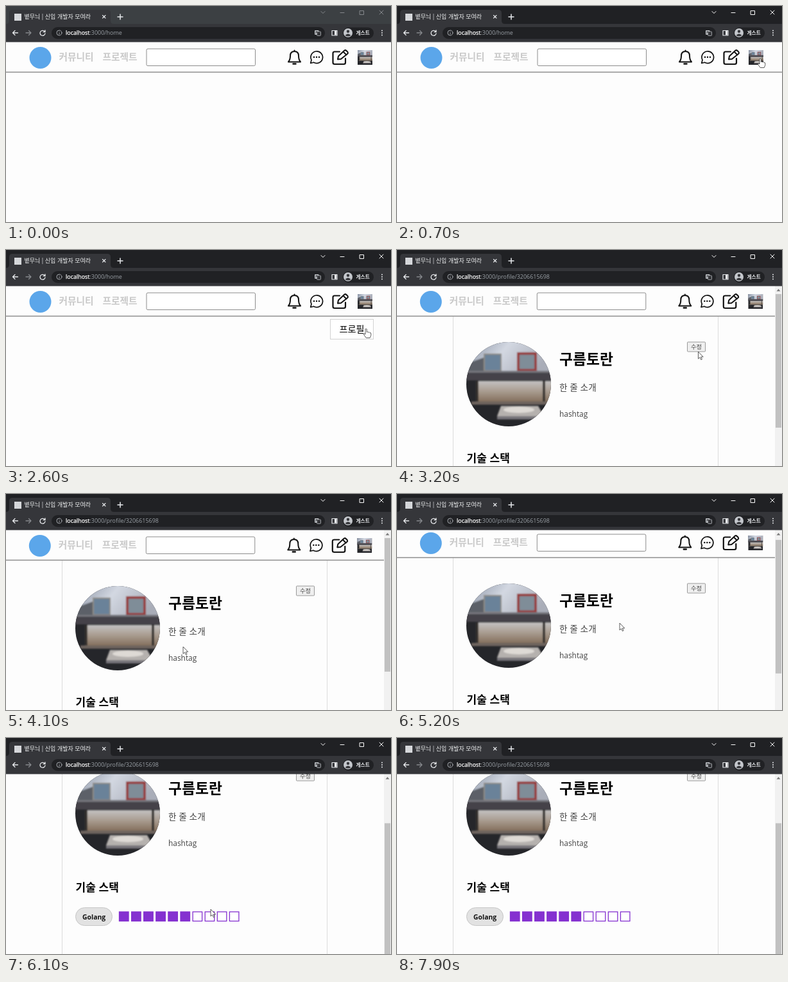
Write an HTML page that moves like this. It is 600x338 px and loops after 8 s.

```html
<!DOCTYPE html>
<html lang="ko">
<head>
<meta charset="utf-8">
<style>
  html, body { margin: 0; width: 100%; height: 100%; overflow: hidden; background: #fdfdfd; }
  svg { display: block; width: 600px; height: 338px; }
  text { font-family: "Open Sans", "Noto Sans CJK KR", "Noto Sans CJK", sans-serif; white-space: pre; }
  .ko { font-family: "Noto Sans CJK KR", "Noto Sans CJK", sans-serif; }
  .b { font-weight: 700; }
  .m { font-weight: 500; }
  .line { fill: none; stroke-linecap: round; stroke-linejoin: round; }
</style>
</head>
<body>
<svg viewBox="0 0 600 338">
  <defs>
    <linearGradient id="wall" x1="0" x2="1" y1="0" y2=".3">
      <stop offset="0" stop-color="#7d8799"/><stop offset=".5" stop-color="#d3d8e2"/><stop offset="1" stop-color="#a9adb8"/>
    </linearGradient>
    <linearGradient id="view" x2="0" y2="1">
      <stop offset="0" stop-color="#c3c2c2"/><stop offset=".5" stop-color="#a99c90"/><stop offset="1" stop-color="#85715e"/>
    </linearGradient>
    <filter id="soft"><feGaussianBlur stdDeviation=".8"/></filter>
    <clipPath id="round"><circle cx="66" cy="66" r="66"/></clipPath>
    <symbol id="photo" viewBox="0 0 132 132">
      <rect width="132" height="132" fill="#25262a"/>
      <g filter="url(#soft)">
        <rect x="-4" y="-4" width="140" height="52" fill="url(#wall)"/>
        <path d="M0 34L28 24V47H0Z" fill="#5c6068"/>
        <rect x="27" y="18" width="28" height="28" fill="#8f8c86"/>
        <rect x="29" y="20" width="24" height="24" fill="#6a8299"/>
        <rect x="79" y="16" width="31" height="30" fill="#963c3e"/>
        <rect x="83" y="20" width="23" height="22" fill="#7f8d98"/>
        <rect x="-4" y="46" width="140" height="14" fill="#45434a"/>
        <rect x="-4" y="45" width="140" height="3" fill="#74747c"/>
        <rect x="15" y="61" width="121" height="32" fill="url(#view)"/>
        <path d="M17 61V93M121 61V93" stroke="#34302e" stroke-width="4"/>
        <rect x="8" y="93" width="124" height="5" fill="#6d645d"/>
        <path d="M54 100H112L121 116H48Z" fill="#b5b1ae"/>
        <ellipse cx="82" cy="106" rx="24" ry="5" fill="#dedad5"/>
        <path d="M48 116H121V121H48Z" fill="#77757a"/>
      </g>
    </symbol>
  </defs>

  <rect width="600" height="338" fill="#fdfdfd"/>

  <g id="page">
    <g id="profile">
      <path d="M87.5 104V440M500.5 104V440" stroke="#dcdcdc"/>
      <g transform="translate(108 144)" clip-path="url(#round)"><use href="#photo" width="132" height="132"/></g>
      <text class="ko b" x="253" y="178.6" font-size="22.8">구름토란</text>
      <text class="ko" x="253" y="220" font-size="13.6" fill="#444">한 줄 소개</text>
      <text x="253" y="261" font-size="11.9" fill="#444">hashtag</text>
      <rect x="452.5" y="144" width="28" height="15" rx="1" fill="#efefef" stroke="#9a9a9a"/>
      <text class="ko" x="458" y="155" font-size="9.2" fill="#444">수정</text>
      <text class="ko b" x="108.5" y="332" font-size="17">기술 스택</text>
      <rect x="108.5" y="357.5" width="57" height="28" rx="14" fill="#e2e2e2" stroke="#c6c6c6"/>
      <text class="b" x="119" y="376" font-size="10.4" fill="#111">Golang</text>
      <g id="skills" stroke="#8531d0" stroke-width="1.3"></g>
    </g>

    <g id="header">
      <path d="M-5 103.5H605" stroke="#8c8c8c" stroke-width="1.3"/>
      <circle cx="53.5" cy="81" r="17" fill="#5ba6ea"/>
      <g class="ko b" font-size="14.7" fill="#c9c9c9">
        <text class="ko" x="82.5" y="85.3">커뮤니티</text><text class="ko" x="150.5" y="85.3">프로젝트</text>
      </g>
      <rect x="219" y="67" width="169.5" height="26.5" rx="2" fill="#fff" stroke="#8c8c8c"/>
      <g class="line" stroke="#111" stroke-width="2">
        <path d="M440 87.5Q443 84 443 78Q443 71 449.5 71Q456 71 456 78Q456 84 459 87.5ZM449.5 71V69.5"/>
        <path d="M447.5 90.5H451.5" stroke-width="2.4"/>
        <path d="M474.7 89.5L476 84.5A9.3 9.3 0 1 1 479.5 88.2Z" stroke-width="1.7"/>
        <path d="M480 80H480.01M484 80H484.01M488 80H488.01" stroke-width="2.5"/>
        <path d="M520 71.5H512Q509.5 71.5 509.5 74V88.5Q509.5 91 512 91H526.5Q529 91 529 88.5V82" stroke-width="2.2"/>
        <path d="M517 83.5L518 78.5L527.5 69.5Q529 68.5 530.5 70L532.5 72Q533.5 73.5 532 75L522 83ZM525.5 71.5L530.5 76.5"/>
      </g>
      <use href="#photo" x="548" y="69" width="23" height="23"/>
    </g>
  </g>

  <g id="menu">
    <rect x="505.5" y="108.5" width="67" height="31" fill="#fff" stroke="#d2d2d2"/>
    <text class="ko" x="519.5" y="129" font-size="14.2">프로필</text>
  </g>

  <g id="scrollbar">
    <rect x="589" y="56" width="11" height="282" fill="#f1f1f1"/>
    <path d="M591.5 64.5L594.5 61L597.5 64.5Z" fill="#777"/>
    <rect id="thumb" x="590" y="69" width="9" height="209" fill="#c1c1c1"/>
  </g>

  <g id="browser">
    <rect id="strip" width="600" height="29"/>
    <path d="M0 28Q5 28 5 23V11Q5 6 10 6H158Q163 6 163 11V23Q163 28 168 28H600V56.5H0Z" fill="#35363a"/>
    <rect x="13" y="12" width="11" height="11" fill="#d5d7da"/>
    <text class="ko m" x="28.5" y="19.8" font-size="9" fill="#f1f3f4">볕무늬 | 신입 개발자 모여라</text>
    <rect x="71" y="33" width="426" height="18.5" rx="9.25" fill="#202124"/>
    <rect x="525" y="33.5" width="48" height="17.5" rx="8.75" fill="#202124"/>
    <text x="93" y="45.3" font-size="8.95" fill="#9aa0a6"><tspan fill="#fff" stroke="#fff" stroke-width=".25">localhost</tspan>:3000/<tspan id="path"></tspan></text>
    <text class="ko b" x="545.5" y="45" font-size="7.7" fill="#e8eaed">게스트</text>
    <g class="line" stroke="#e8eaed" stroke-width="1.3">
      <path d="M150.5 14.5L155 19M155 14.5L150.5 19" stroke-width="1.1"/>
      <path d="M174 17H182M178 13V21" stroke-width="1.5"/>
      <path d="M18.5 42H10.5M14 38.5L10.5 42L14 45.5"/>
      <path d="M31 42H39M35.5 38.5L39 42L35.5 45.5" stroke="#85888c"/>
      <path d="M60.3 40A4 4 0 1 0 61 43M61 38V40.7H58.3"/>
      <circle cx="83" cy="42" r="4" stroke="#a5a8ad" stroke-width="1"/>
      <path d="M83 42V44M83 40V40.01" stroke="#a5a8ad" stroke-width="1"/>
      <rect x="508" y="38.5" width="8" height="7.5" stroke-width="1.2"/>
      <path d="M513.5 39V45.5" stroke-width="3" stroke-linecap="butt"/>
      <path d="M586 38.5V38.51M586 42V42.01M586 45.5V45.51" stroke-width="2"/>
    </g>
    <rect x="481" y="38" width="6.5" height="7" rx="1" fill="#b9bcc0"/>
    <rect x="484.5" y="40" width="6" height="6.5" rx="1" fill="#35363a" stroke="#b9bcc0" stroke-width=".8"/>
    <path d="M482.5 40.5H486M484.2 39.5V40.5L482.5 43" class="line" stroke="#35363a" stroke-width=".8"/>
    <circle cx="533" cy="42" r="7" fill="#c4c7cc"/>
    <circle cx="533" cy="39.8" r="2.2" fill="#35363a"/>
    <path d="M528.5 46Q533 41 537.5 46Q533 49 528.5 46Z" fill="#35363a"/>
    <path id="controls" class="line" d="M491 8.5L494 11.5L497 8.5M521 10.5H527M551.5 7.5H557.5V13.5H551.5ZM582 7L588 13M588 7L582 13"/>
  </g>

  <g id="cursor" stroke-linejoin="round">
    <path id="arrow" d="M0 0V11L2.5 8.7L4.3 12.5L6 11.7L4.3 8H7.7Z" fill="#fff" stroke="#333" stroke-width=".8"/>
    <path id="hand" d="M0 1Q1.2-.7 2.3 1V5.5Q4 4.5 4.7 5.8Q6.4 5 7 6.5Q8.8 6 8.8 8V10.5L7.2 14.5H1.2L-2.6 9Q-2.5 7.2-1 8L0 9Z" fill="#fff" stroke="#333" stroke-width=".8"/>
    <path id="beam" d="M-2.5-7H2.5M0-7V7M-2.5 7H2.5" fill="none" stroke="#333"/>
  </g>
</svg>
<script>
const LOOP = 8000, STEP = 100;
const $ = id => document.getElementById(id);
const show = (id, on) => $(id).style.display = on ? '' : 'none';

// time, x, y, pointer shape
const track = [
  [700, 565, 82, 'hand'], [1000, 565, 82, 'hand'], [1300, 552, 122, 'hand'],
  [1600, 559, 82, 'arrow'], [1900, 486, 152, 'arrow'], [2300, 556, 126, 'hand'],
  [2500, 560, 123, 'hand'], [2900, 560, 123, 'arrow'], [3600, 330, 215, 'arrow'],
  [4100, 276, 239, 'arrow'], [4600, 224, 236, 'arrow'], [4900, 347, 202, 'arrow'],
  [5500, 347, 202, 'arrow'], [6100, 319, 268, 'arrow'], [6500, 140, 304, 'arrow'],
  [6900, 325, 75, 'arrow'], [7250, 48, 318, 'arrow'], [7700, 309, 78.5, 'beam'], [7900, 309, 78.5, 'beam']
];

const smooth = p => p * p * (3 - 2 * p);
const progress = (t, from, to) => smooth(Math.min(1, Math.max(0, (t - from) / (to - from))));

for (let i = 0; i < 10; i++) {
  const box = document.createElementNS('http://www.w3.org/2000/svg', 'rect');
  const attrs = { x: 176.5 + i * 19.1, y: 364, width: 14.5, height: 14.5, fill: i < 6 ? '#8531d0' : '#fff' };
  for (const key in attrs) box.setAttribute(key, attrs[key]);
  $('skills').append(box);
}

function drawCursor(t) {
  const i = track.findIndex(([time]) => time > t);
  show('cursor', i > 0);
  if (i < 1) return;
  const [t0, x0, y0, shape] = track[i - 1], [t1, x1, y1] = track[i];
  const p = progress(t, t0, t1);
  $('cursor').setAttribute('transform', `translate(${x0 + (x1 - x0) * p} ${y0 + (y1 - y0) * p})`);
  for (const id of ['arrow', 'hand', 'beam']) show(id, id === shape);
}

function draw(t) {
  const active = t >= 700, profile = t >= 2800;
  const scroll = t < 5200 ? 0 : 4 + 88 * progress(t, 5200, 5700);
  $('strip').setAttribute('fill', active ? '#202124' : '#3c4043');
  $('controls').setAttribute('stroke', active ? '#fff' : '#85888c');
  $('path').textContent = profile ? 'profile/3206615698' : 'home';
  show('menu', t >= 1000 && !profile);
  show('profile', profile);
  show('scrollbar', profile);
  $('header').setAttribute('transform', `translate(${profile ? -0.7 : 0} 0)`);
  $('page').setAttribute('transform', `translate(0 ${-scroll})`);
  $('thumb').setAttribute('y', 69 + scroll * 0.7);
  drawCursor(t);
}

function tick() {
  draw(Math.floor(performance.now() % LOOP / STEP) * STEP);
  requestAnimationFrame(tick);
}
tick();
</script>
</body>
</html>
```
